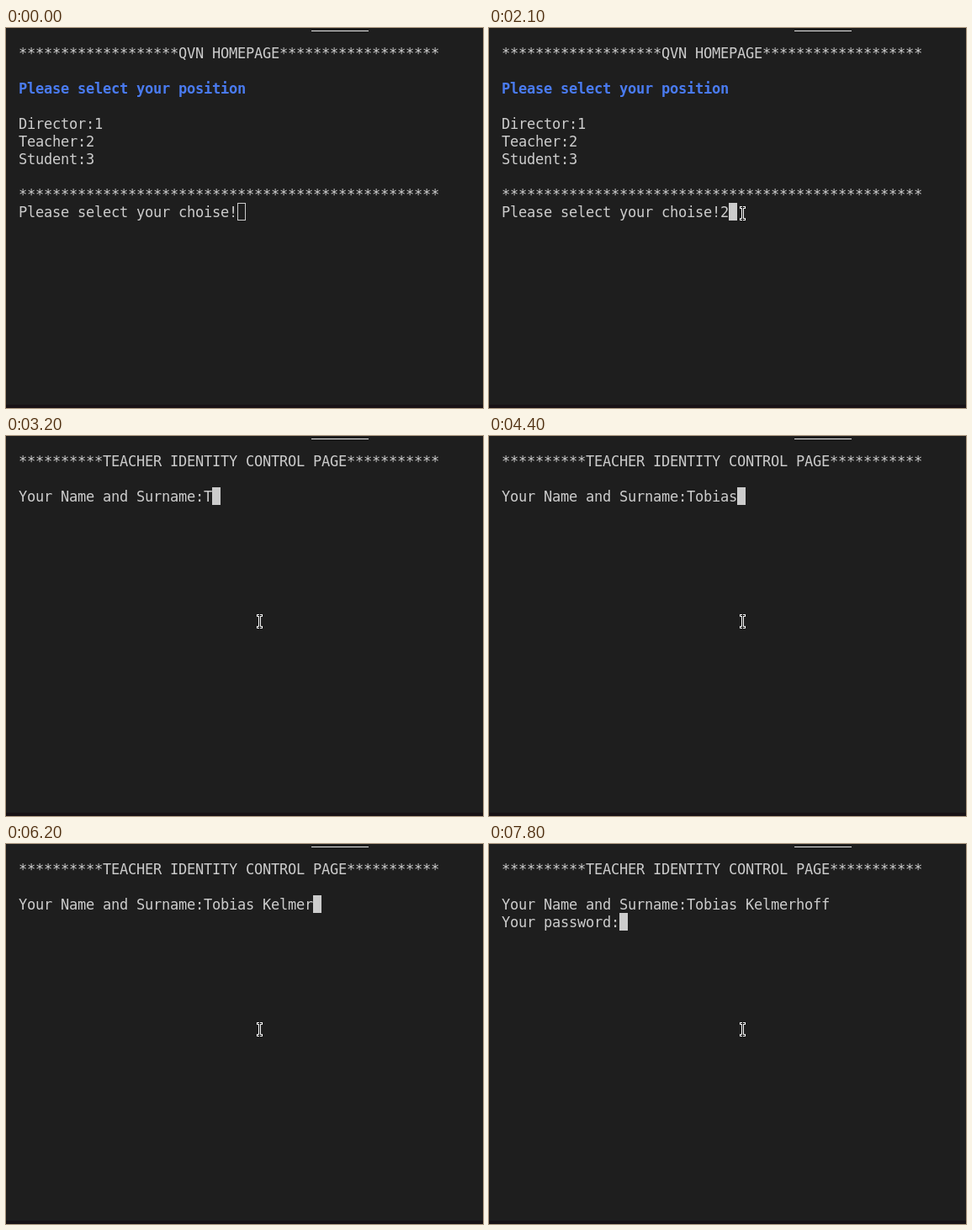
Recreate the animation shown at these times as an HTML page. Size 567x452 px, loop 8 s.

```html
<!DOCTYPE html>
<html lang="en">
<head>
<meta charset="utf-8">
<title>Terminal login</title>
<style>
  html, body { margin: 0; width: 100%; height: 100%; overflow: hidden; background: #1e1e1e; }
  pre, i, svg { position: absolute; }
  pre {
    left: 15px; top: 20px; margin: 0; color: #ccc;
    font: 17px/21px "DejaVu Sans Mono", monospace;
    letter-spacing: calc(10px - 1ch);
  }
  b { color: #4a7bf0; }
  #tab { left: 363px; top: 3px; width: 68px; height: 1px; background: #e7e7e7; }
  #edge { left: 0; top: 448px; width: 567px; height: 4px; background: #181216; }
  #caret { width: 10px; height: 21px; box-sizing: border-box; border: 1px solid #ccc; }
  svg { left: 0; top: 0; }
</style>
</head>
<body>
<i id="tab"></i>
<i id="edge"></i>
<pre id="screen"></pre>
<i id="caret"></i>
<svg width="567" height="452" fill="none" stroke-linecap="square">
  <g id="pointer">
    <path d="M-2-7H2M0-7V7M-2 7H2" stroke="#fff" stroke-width="3"/>
    <path d="M-2-7H2M0-8V8M-2 7H2" stroke="#111"/>
  </g>
</svg>
<script>
const LOOP = 8000, STEP = 100;
const FOCUS = 1100, CHOICE = 2100, NEXT_PAGE = 2200, ENTER = 7800;
const NAME = "Tobias Kelmerhoff";
const KEYS = [3200, 3600, 3700, 4000, 4100, 4400, 4600, 5200, 5700, 5800,
              6000, 6100, 6200, 6900, 7000, 7100, 7200];
const [screen, caret, pointer] =
  ["screen", "caret", "pointer"].map(id => document.getElementById(id));

const stars = n => "*".repeat(n);
const home = `${stars(19)}QVN HOMEPAGE${stars(19)}

<b>Please select your position</b>

Director:1
Teacher:2
Student:3

${stars(50)}
Please select your choise!`;
const login = `${stars(10)}TEACHER IDENTITY CONTROL PAGE${stars(11)}

Your Name and Surname:`;

function textAt(t) {
  if (t < NEXT_PAGE) return home + (t >= CHOICE ? "2" : "");
  const typed = KEYS.filter(key => key <= t).length;
  return login + NAME.slice(0, typed) + (t >= ENTER ? "\nYour password:" : "");
}

let shown;
function draw(now) {
  const t = Math.floor(now % LOOP / STEP) * STEP;
  const text = textAt(t);
  if (text !== shown) screen.innerHTML = shown = text;

  const lines = text.split("\n");
  caret.style.left = 15 + 10 * lines.at(-1).length + "px";
  caret.style.top = 19 + 21 * (lines.length - 1) + "px";
  caret.style.background = t >= FOCUS ? "#ccc" : "none";

  // The pointer glides in and slows down as it nears the caret.
  const left = (1 - Math.min(1, Math.max(0, (t - 400) / 400))) ** 2;
  pointer.setAttribute("transform",
    `translate(${Math.round(301 - 93 * left) + 0.5} ${Math.round(220 + 128 * left) + 0.5})`);
  pointer.setAttribute("visibility", t >= 400 ? "visible" : "hidden");
  requestAnimationFrame(draw);
}
draw(0);
</script>
</body>
</html>
```
